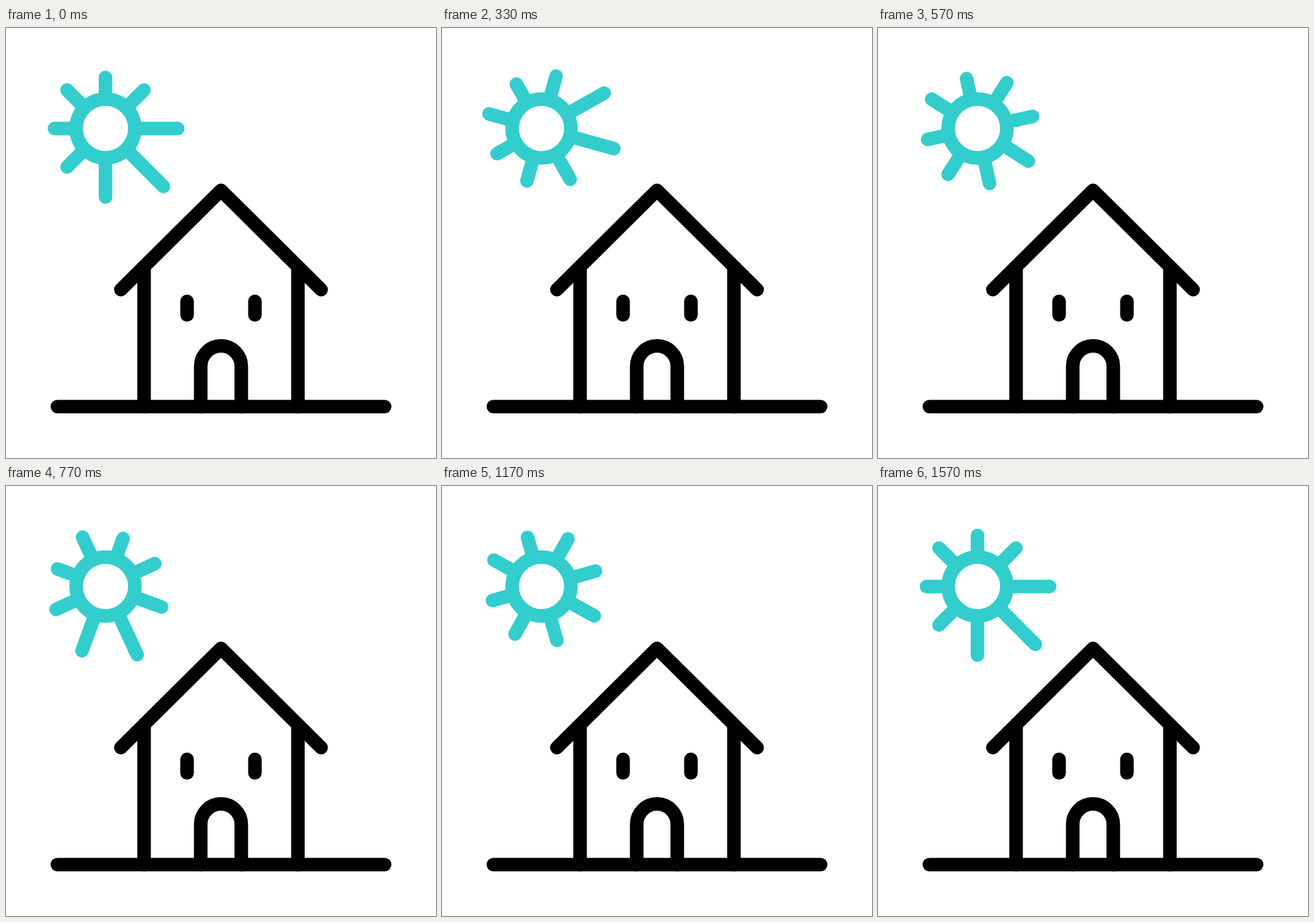
An HTML page that plays this animation: 640x640 px, repeating every 1.67 s.

```html
<!DOCTYPE html>
<html lang="en">
<head>
<meta charset="utf-8">
<title>House in the sun</title>
<style>
  html, body { margin: 0; width: 100%; height: 100%; overflow: hidden; background: #fff; }
  svg { display: block; width: 100%; height: 100%; }
  .line { fill: none; stroke-width: 20.2; stroke-linecap: round; stroke-linejoin: round; }
  .house { stroke: #000; }
  .sun { stroke: #33cdcd; }
</style>
</head>
<body>
<svg viewBox="0 0 640 640">
  <g class="line house">
    <path d="M76.5 563.5H563.5"/>
    <path d="M205.5 357V563.5M434.5 357V563.5"/>
    <path d="M171 389.3L320 241.6L469 389.3"/>
    <path d="M269.5 406.8V427M370.5 406.8V427"/>
    <path d="M289.8 563.5V503.4a30.2 30.2 0 0 1 60.4 0V563.5"/>
  </g>
  <g class="line sun" transform="translate(148.1 149.6)">
    <circle r="43.7"/>
    <path id="rays"/>
  </g>
</svg>
<script>
  const LOOP = 1670, STEP = 1000 / 30;
  const rays = document.getElementById('rays');

  // Keys are [step, value] pairs, joined by sine easing.
  const sway = [[1, 0], [12, -32], [24, 21], [34.5, -16], [47, 0]];

  // A ray shrinks and regrows twice; the offset delays its pulses.
  const pulse = (long, short, lag) => [
    [4.2 + lag, long], [12.8 + lag, short],
    [15.5 + lag, short], [23.6 + lag, long],
    [23.8 + lag, long], [30.2 + lag, short],
    [33.6 + lag, short], [42 + lag, long]
  ];
  const pulses = [
    pulse(107.5, 83.5, 5),
    pulse(122, 90, 2.5),
    pulse(102, 82, 0)
  ];

  function valueAt(keys, k) {
    if (k <= keys[0][0]) return keys[0][1];
    for (let i = 1; i < keys.length; i++) {
      const [k0, v0] = keys[i - 1], [k1, v1] = keys[i];
      if (k <= k1) {
        const ease = (1 - Math.cos(Math.PI * (k - k0) / (k1 - k0))) / 2;
        return v0 + (v1 - v0) * ease;
      }
    }
    return keys[keys.length - 1][1];
  }

  function draw(k) {
    let d = '';
    for (let i = 0; i < 8; i++) {
      const a = i * Math.PI / 4, x = Math.cos(a), y = Math.sin(a);
      const tip = pulses[i] ? valueAt(pulses[i], k) : i % 2 ? 81 : 76;
      d += `M${x * 44} ${y * 44}L${x * tip} ${y * tip}`;
    }
    rays.setAttribute('d', d);
    rays.setAttribute('transform', `rotate(${valueAt(sway, k)})`);
  }

  const start = performance.now();
  function tick() {
    const t = (performance.now() - start) % LOOP;
    draw(Math.floor(t / STEP + 0.15));
    requestAnimationFrame(tick);
  }
  tick();
</script>
</body>
</html>
```
